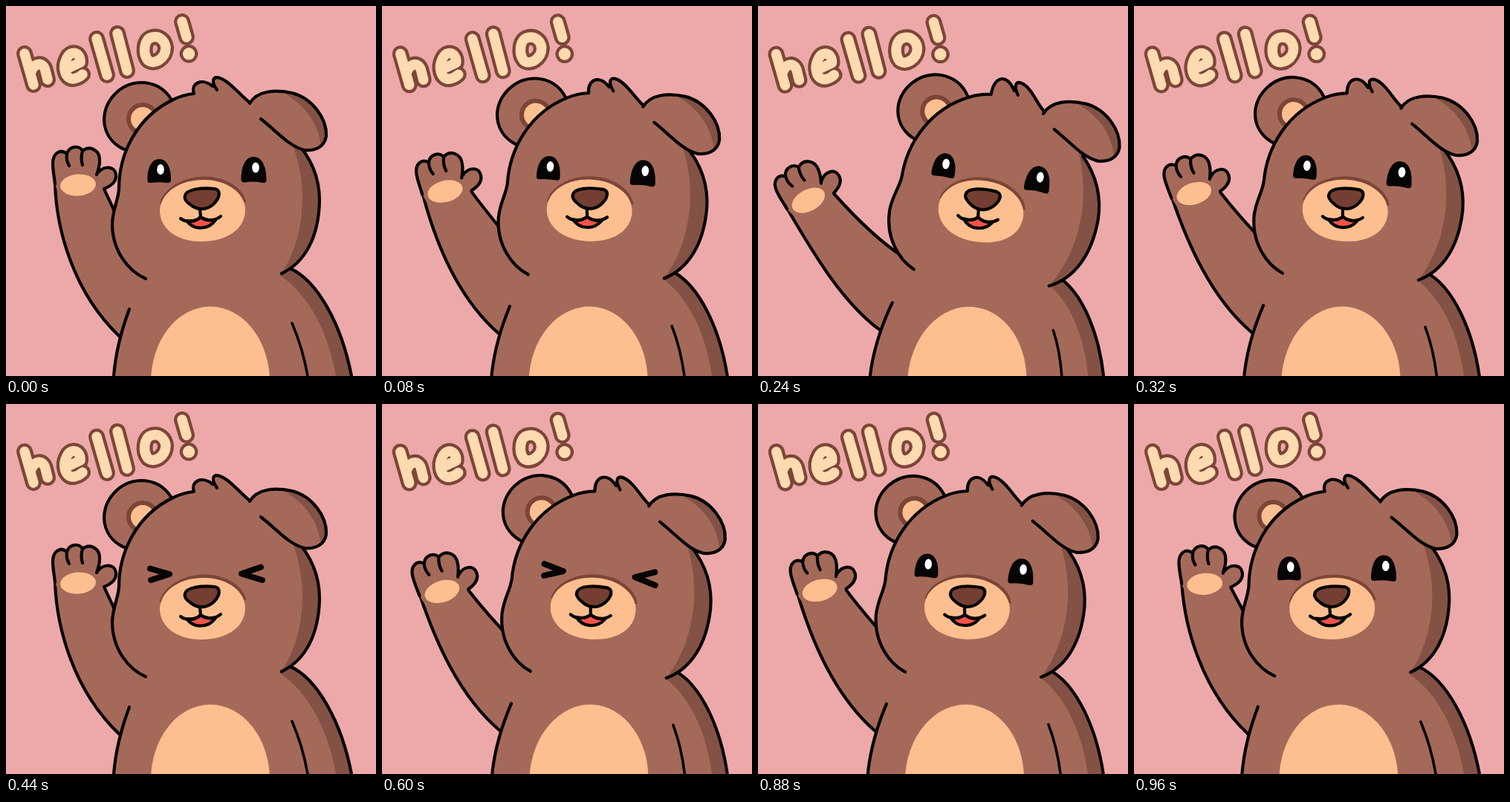
An HTML page for the animation above (1 s loop, 498 by 498 pixels).

```html
<!DOCTYPE html>
<html lang="en">
<head>
<meta charset="utf-8">
<title>Waving bear</title>
<style>
  html, body { margin: 0; width: 100%; height: 100%; overflow: hidden; background: #eda9aa; }
  svg { display: block; width: 100vw; height: 100vh; }
  .fur { fill: #a5695a; }
  .shade { fill: #845245; }
  .peach { fill: #fdbf8f; }
  .line { fill: none; stroke: #060404; stroke-width: 4.2; stroke-linecap: round; stroke-linejoin: round; }
  .fur.line { fill: #a5695a; }
  .wink { stroke-width: 8; }
  .ink { fill: #060404; }
  .letters { fill: none; stroke-linecap: round; stroke-linejoin: round; }
</style>
</head>
<body>
<svg viewBox="0 0 498 498" role="img" aria-label="hello! A bear waves">
  <defs>
    <g id="word">
      <path d="M25 64L37 106M33 91C37 76 50 74 53 87L56 99"/>
      <path d="M83 84L100 76C101 63 88 58 82 70C75 83 80 99 91 98C97 97 101 94 103 92"/>
      <path d="M122 44L136 93M150 37L163 87"/>
      <path d="M197 42C185 44 184 64 191 73C199 80 215 71 215 56C214 46 206 40 197 42Z"/>
      <path d="M237 21L243 42M246 63A1.300 1.300 0 1 0 246.100 63"/>
    </g>
  </defs>
  <rect width="498" height="498" fill="#eda9aa"/>

  <g id="title" class="letters">
    <use href="#word" stroke="#7c4638" stroke-width="22"/>
    <use href="#word" stroke="#fddab0" stroke-width="13.500"/>
  </g>

  <path id="armFill" class="fur"/>
  <path id="armLine" class="line"/>
  <g id="hand">
    <path class="fur" d="M66 240C65 230 63 222 63 212C63 197 74 192 82 199C85 188 99 187 103 195C113 187 127 194 126 209L124 224C133 214 147 216 148 227C149 236 142 242 132 246L110 265L75 265Z"/>
    <path class="line" d="M66 240C65 230 63 222 63 212C63 197 74 192 82 199C85 188 99 187 103 195C113 187 127 194 126 209C126 216 124 221 122 227M124 224C133 214 147 216 148 227C149 236 142 242 132 246M82 199C81 205 82 210 85 215M103 195C101 202 101 208 103 214"/>
    <ellipse class="peach" cx="97" cy="241" rx="24" ry="14.5" transform="rotate(-4 97 241)"/>
  </g>

  <g id="body">
    <path id="torso" class="fur"/>
    <path id="flank" class="shade"/>
    <ellipse class="peach" cx="275" cy="506" rx="80" ry="101.5"/>
    <path id="torsoLine" class="line"/>
    <path id="sleeve" class="line" style="stroke-width:3.6"/>
  </g>

  <g id="head">
    <path class="fur line" d="M222 125C212 109 198 103 181 103C153 104 132 128 132 154C133 172 143 185 157 192L168 196"/>
    <circle class="peach" cx="184" cy="152" r="19" stroke="#7c4537" stroke-width="6"/>
    <path id="skull" class="fur"/>
    <path class="shade" d="M380 172L388 180C412 205 422 232 422 262C421 310 403 345 371 360C393 325 399 290 399 255C398 225 392 200 380 172Z"/>
    <path id="skullLine" class="line"/>
    <g id="ear">
      <path class="fur" d="M328 131C338 114 362 112 385 117C412 124 432 151 431 175C429 190 416 195 402 194C381 189 366 170 343 152Z"/>
      <path class="shade" d="M370 115L385 117C412 124 432 151 431 175C430 184 427 189 424 191C422 160 403 132 370 115Z"/>
      <path class="line" d="M328 131C338 114 362 112 385 117C412 124 432 151 431 175C429 190 416 195 402 194C381 189 366 170 343 152"/>
    </g>

    <path fill="none" stroke="#7c4537" stroke-width="5" d="M209 267C214 246 240 232.500 266 232C295 231.500 317 247 321 264"/>
    <path class="peach" d="M207 275C209 248 238 234 265 234C294 233 322 250 322 274C322 302 295 317 263 317C230 317 207 300 207 275Z"/>
    <path class="line" style="fill:#f4524b" d="M243 289Q251 299.500 263 298.500Q275 298 282 288Q270 290 262 284Q255 291 243 289Z"/>
    <path class="line" d="M261 274L262 284M235 286C243 292 255 291 262 284C270 290 282 289 289 283"/>
    <path class="line" style="fill:#743f32" d="M241 255C243 247 262 244 281 246C290 248 288 258 279 267C270 275 258 275 249 268C243 264 239 260 241 255Z"/>

    <g id="open">
      <path class="ink" d="M190.500 235C190 219 195 206 206.500 206C218 206 222.500 221 222 234Q222 238.500 217 238Q206 236.500 195 238Q190.500 238.500 190.500 235Z"/>
      <path class="ink" d="M316.500 234C316.500 216 322 203 333.500 203C346 203 350.500 219 350.500 234Q350.500 238.500 346 238Q333 235.500 321 237.500Q316.500 237.500 316.500 234Z"/>
      <ellipse cx="208" cy="220" rx="4.800" ry="7" fill="#fff"/>
      <ellipse cx="336" cy="217.500" rx="4.800" ry="7" fill="#fff"/>
    </g>
    <path id="shut" class="line wink" d="M194 221.500L220 229L195 237M343 219.500L317 228.500L345 237"/>
  </g>
</svg>
<script>
const LOOP = 1000, STEP = 40;
// sway over time: 0 = upright, 1 = leaning right
const SWAY = [[0, 0], [185, 1], [209, 1], [440, 0], [480, 0], [712, 1], [745, 1], [1000, 0]];
const BLINK = [400, 680];

// arm edges as cubic control points, upright and leaning
const OUTER = [[66, 240, 68, 300, 90, 385, 153, 445], [38, 274, 75, 335, 115, 400, 165, 436]];
const INNER = [[132, 246, 137, 258, 145, 272, 156, 300], [100, 252, 128, 283, 161, 317, 197, 339]];

const el = id => document.getElementById(id);
const lerp = (a, b, k) => a + (b - a) * k;
const turn = (id, deg, x, y) => el(id).setAttribute("transform", `rotate(${deg} ${x} ${y})`);
const draw = (id, d) => el(id).setAttribute("d", d);

function swayAt(t) {
  const i = SWAY.findIndex(([end]) => end > t);
  const [t0, a] = SWAY[i - 1], [t1, b] = SWAY[i];
  return lerp(a, b, (1 - Math.cos(Math.PI * (t - t0) / (t1 - t0))) / 2);
}

function drawArm(k) {
  const blend = ([a, b]) => a.map((v, i) => lerp(v, b[i], k));
  const o = blend(OUTER), n = blend(INNER);
  const outer = `M${o[0]} ${o[1]}C${o.slice(2).join(" ")}`;
  const inner = `M${n[0]} ${n[1]}C${n.slice(2).join(" ")}`;
  draw("armLine", outer + inner);
  draw("armFill", `${outer}L215 425L215 345L${n[6]} ${n[7]}C${n[4]} ${n[5]} ${n[2]} ${n[3]} ${n[0]} ${n[1]}Z`);
  el("hand").setAttribute("transform",
    `translate(${lerp(97, 66.5, k)} ${lerp(241, 262.5, k)}) rotate(${-25 * k}) translate(-97 -241)`);
}

// the right hip stays planted while the rest of the body leans
function drawBody(k) {
  const hip = x => x - 5 * k;
  const left = "M166 408C157 432 148 460 145 498L143 540";
  const right = `382 353C420 370 ${452 - 2 * k} 430 ${hip(465)} 498L${hip(474)} 540`;
  draw("torso", `M${right}L143 540L145 498C148 460 157 432 166 408L200 340Z`);
  draw("flank", `M${right}L${hip(450)} 540L${hip(444)} 498C${434 - 3 * k} 440 408 388 368 362Z`);
  draw("torsoLine", `${left}M${right}`);
  draw("sleeve", `M385 427C394 448 ${402 - 2 * k} 475 ${406 - 3 * k} 498L${413 - 3 * k} 540`);
}

function drawSkull(k) {
  const up = y => y - 11 * k;
  const lean = x => x + 5 * k;
  const side = "M188 367C165 357 143 330 143 293C144 272 151 262 152 246C152 200 175 150 225 126C235 121 243 119 253 118";
  const tuft = `C${lean(248)} ${up(104)} ${lean(264)} ${up(96)} ${lean(278)} 108`;
  const tuft2 = `C${lean(275)} 100 ${lean(279)} 94 ${lean(288)} 97C${lean(302)} 102 316 121 328 130`;
  const cheek = "C412 205 422 232 422 262C421 310 403 345 371 360";
  draw("skull", `${side}${tuft}${tuft2}C352 146 372 160 388 180${cheek}Z`);
  draw("skullLine", `${side}${tuft}M${lean(284)} 113${tuft2}M388 180${cheek}`);
}

function render(ms) {
  const t = Math.floor(ms % LOOP / STEP) * STEP;
  const k = swayAt(t);
  const shut = t >= BLINK[0] && t < BLINK[1];
  turn("head", 9.6 * k, 277, 497);
  turn("ear", -9 * k, 336, 142);
  turn("body", 5 * k, 277, 580);
  drawArm(k);
  drawBody(k);
  drawSkull(k);
  el("title").setAttribute("transform", `translate(${-0.6 * k} ${0.8 * k})`);
  el("open").style.display = shut ? "none" : "";
  el("shut").style.display = shut ? "" : "none";
}

const start = performance.now();
function tick() {
  render(performance.now() - start);
  requestAnimationFrame(tick);
}
tick();
</script>
</body>
</html>
```
